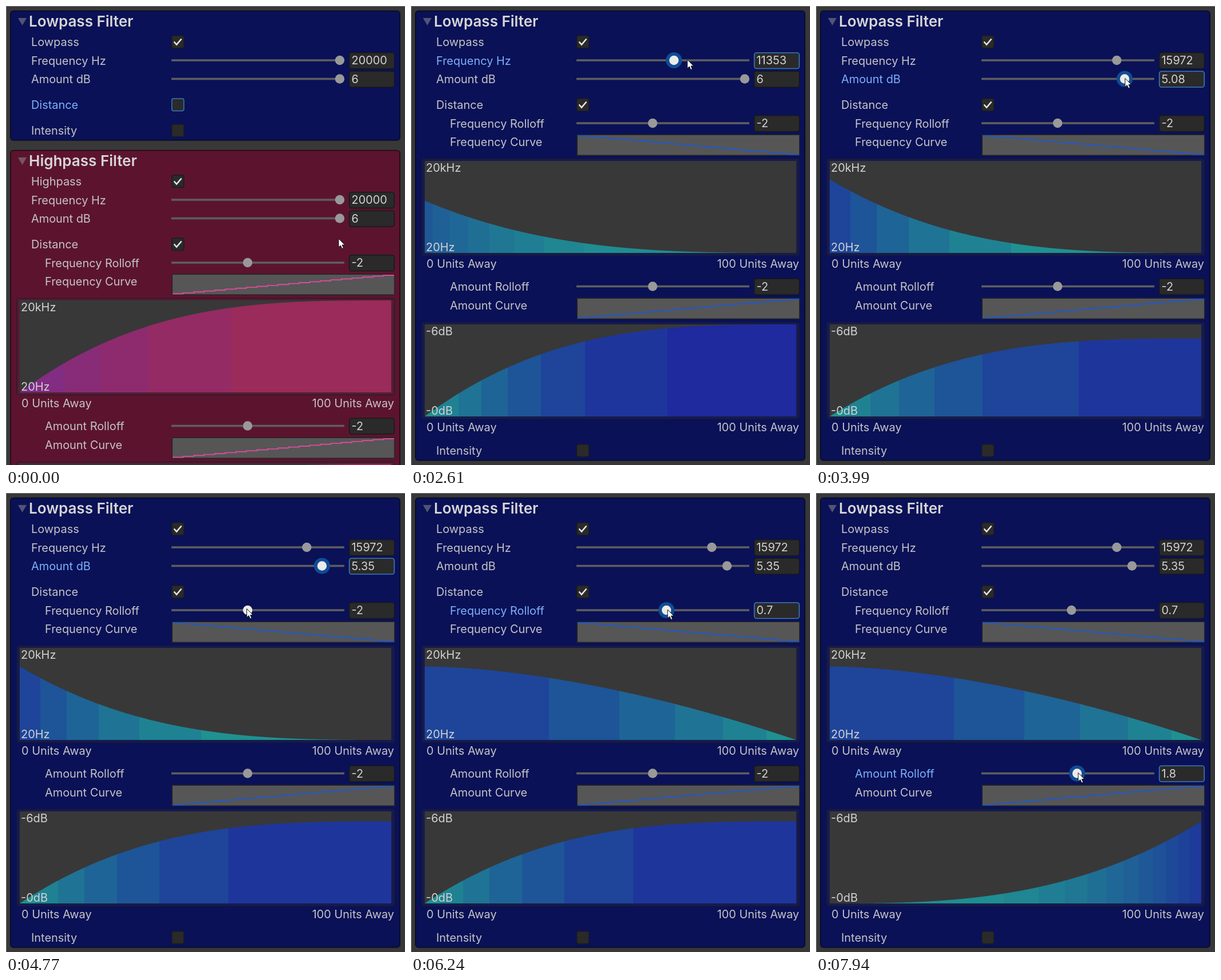
An HTML page with a canvas for the animation above (8 s loop, 697x803 px).

```html
<!DOCTYPE html>
<html lang="en">
<head>
<meta charset="utf-8">
<title>Filter inspector</title>
<style>
  html, body { margin: 0; width: 100%; height: 100%; overflow: hidden; background: #383838; }
  canvas { display: block; }
</style>
</head>
<body>
<canvas id="stage" width="697" height="803"></canvas>
<script>
const ctx = document.getElementById('stage').getContext('2d');
const LOOP = 8000;
const EXPAND_AT = 730;
const LAG = 60; // the knobs trail the pointer by this many ms

const controls = {
  frequency: { label: 'Frequency Hz', y: 95, min: 0, max: 20000, digits: 0 },
  amount: { label: 'Amount dB', y: 127.5, min: 0, max: 6, digits: 2 },
  freqRolloff: { label: 'Frequency Rolloff', y: 205, min: -16, max: 16, digits: 1, indent: true },
  amountRolloff: { label: 'Amount Rolloff', y: 490.5, min: -16, max: 16, digits: 1, indent: true }
};
const defaults = { distance: true, frequency: 20000, amount: 6, freqRolloff: -2, amountRolloff: -2 };

// A drag drifts to its final value while swinging on a sine; the pointer sets off at `reach`.
const drags = [
  { name: 'frequency', reach: 1830, start: 1930, end: 2780, to: 15972, swing: -9268, waves: 0.5 },
  { name: 'amount', reach: 3210, start: 3480, end: 4480, to: 5.35, swing: -0.589, waves: 0.5 },
  { name: 'freqRolloff', reach: 4590, start: 4800, end: 6100, to: 0.7, swing: -5.03, waves: 1 },
  { name: 'amountRolloff', reach: 6550, start: 7420, end: 7940, to: 1.8, swing: 0, waves: 0.5 }
];
const stops = [
  { reach: 60, start: 550, x: 303, y: 170 },
  { reach: 1390, start: 1600, x: 560, y: 90 },
  ...drags
];

const clamp = p => Math.min(1, Math.max(0, p));
const lerp = (a, b, p) => a + (b - a) * p;
const easeOut = p => 1 - (1 - p) ** 2;
const mix = (a, b, p) => `rgb(${a.map((v, i) => Math.round(lerp(v, b[i], p)))})`;
const knobX = (c, value) => 297 + 286 * (value - c.min) / (c.max - c.min);
const fall = (x, r) => r < 0 ? (1 - x) ** (1 - r) : 1 - x ** (1 + r);
const rise = (x, r) => r < 0 ? 1 - (1 - x) ** (1 - r) : x ** (1 + r);

function dragValue(drag, t) {
  const p = clamp((t - drag.start) / (drag.end - drag.start));
  return lerp(defaults[drag.name], drag.to, p) + drag.swing * Math.sin(2 * Math.PI * drag.waves * p);
}

function stopPoint(stop, t) {
  if (!stop.name) return stop;
  const control = controls[stop.name];
  return { x: knobX(control, dragValue(stop, t + LAG)) + 2, y: control.y - 1 };
}

function cursorAt(t) {
  let at = { x: 581, y: 407 };
  for (const stop of stops) {
    if (t < stop.reach) break;
    const goal = stopPoint(stop, t), p = easeOut(clamp((t - stop.reach) / (stop.start - stop.reach)));
    at = { x: lerp(at.x, goal.x, p), y: lerp(at.y, goal.y, p) };
  }
  return at;
}

function blueBand(v, fine) {
  const level = fine ? Math.max(1, Math.floor(v / 0.071 + 0.5)) * 0.071
                     : (Math.floor(v / 0.142 + 0.25) + 0.25) * 0.142;
  return mix([31, 149, 144], [30, 42, 157], clamp(level));
}
const pinkBand = v => mix([124, 44, 140], [154, 43, 90], Math.floor(v * 5 + 0.4) / 5);

function text(s, x, y, color = '#c4c4c4', font = '400 19.9px Inter, sans-serif', align = 'left') {
  ctx.font = font;
  ctx.textAlign = align;
  ctx.fillStyle = color;
  ctx.fillText(s, x, y);
}

function box(x, y, w, h, r, fill, stroke, line = 1.5) {
  ctx.beginPath();
  ctx.roundRect(x, y, w, h, r);
  ctx.fillStyle = fill;
  ctx.fill();
  ctx.strokeStyle = stroke;
  ctx.lineWidth = line;
  ctx.stroke();
}

function disc(x, y, r, color) {
  ctx.fillStyle = color;
  ctx.beginPath();
  ctx.arc(x, y, r, 0, Math.PI * 2);
  ctx.fill();
}

function label(name, y, indent, focused) {
  text(name, indent ? 68 : 44, y + 7, focused ? '#7db0fa' : '#c4c4c4');
}

function toggle(name, y, checked, focus) {
  const focused = name === focus;
  label(name, y, false, focused);
  box(289.7, y - 11, 21, 21.5, 3, '#2a2a2a', focused ? '#3a79bb' : '#1c1c1c');
  if (!checked) return;
  ctx.strokeStyle = '#e6e6e6';
  ctx.lineWidth = 2.6;
  ctx.stroke(new Path2D(`M293.5 ${y - 0.5}l4.5 5l8.5 -10`));
}

function slider(name, state) {
  const control = controls[name], y = control.y, value = state[name];
  const focused = control.label === state.focus;
  const x = knobX(control, value);
  label(control.label, y + 0.5, control.indent, focused);
  ctx.fillStyle = '#5e5e5e';
  ctx.fillRect(289, y - 1.8, 302, 3.6);
  if (focused) disc(x, y, 14, '#104c94');
  const hovered = state.cursor && Math.hypot(state.cursor.x - x, state.cursor.y - y) < 26;
  disc(x, y, 8.2, focused || hovered ? '#ebebeb' : '#999999');
  box(599.7, y - 13.3, 78.6, 27.8, 4, '#2a2a2a', focused ? '#3a79bb' : '#191919', 1.6);
  text(String(value), 603.5, y + 7, '#d2d2d2');
}

function curvePreview(name, y, rising, color) {
  label(name, y, true, false);
  ctx.fillStyle = '#242424';
  ctx.fillRect(289.5, y - 13.5, 390, 37.5);
  ctx.fillStyle = '#565656';
  ctx.fillRect(291, y - 12, 387, 34.5);
  const steps = 21, top = y - 11, height = 32.5;
  ctx.strokeStyle = color;
  ctx.lineWidth = 1.8;
  ctx.beginPath();
  for (let i = 0; i < steps; i++) {
    const p = i / (steps - 1), ly = top + height * (rising ? 1 - p : p);
    ctx.lineTo(291 + 387 * i / steps, ly);
    ctx.lineTo(291 + 387 * (i + 1) / steps, ly);
  }
  ctx.stroke();
}

function chart(top, curve, band, high, low) {
  const left = 24, width = 649, height = 161, bottom = top + height;
  box(19, top - 3.5, 659.5, 169, 4, 'rgba(56,56,56,.25)', 'rgba(28,28,40,.7)');
  ctx.fillStyle = '#383838';
  ctx.fillRect(left, top, width, height);
  ctx.save();
  ctx.beginPath();
  ctx.moveTo(left, bottom);
  for (let i = 0; i <= width; i++) ctx.lineTo(left + i, bottom - height * curve(i / width));
  ctx.lineTo(left + width, bottom);
  ctx.clip();
  for (let i = 0; i < width; i++) {
    ctx.fillStyle = band(curve((i + 0.5) / width));
    ctx.fillRect(left + i, top, 1, height);
  }
  ctx.restore();
  text(high, 26, top + 19, '#d2d2d2');
  text(low, 26, top + 158, '#d2d2d2');
  text('0 Units Away', 27, top + 186.5);
  text('100 Units Away', 678, top + 186.5, '#c4c4c4', undefined, 'right');
}

function filterPanel(title, name, theme, state) {
  box(8, 8.7, 680, state.distance ? 786 : 226, 5, theme.fill, theme.edge, 2);
  ctx.fillStyle = 'rgba(140,140,140,.55)';
  ctx.fill(new Path2D('M21 21h15l-7.5 13z'));
  text(title, 40, 36, '#d6d6d6', '600 26px Inter, sans-serif');
  toggle(name, 63, true, state.focus);
  slider('frequency', state);
  slider('amount', state);
  toggle('Distance', 173, state.distance, state.focus);
  if (state.distance) {
    const freqShape = theme.rising ? rise : fall;
    slider('freqRolloff', state);
    curvePreview('Frequency Curve', 238, theme.rising, theme.line);
    chart(271, x => state.frequency / 20000 * freqShape(x, state.freqRolloff),
      v => theme.band(v, ['frequency', 'freqRolloff'].includes(state.dragged)), '20kHz', '20Hz');
    slider('amountRolloff', state);
    curvePreview('Amount Curve', 524, true, theme.line);
    chart(557, x => state.amount / 6 * rise(x, state.amountRolloff),
      v => theme.band(v, state.dragged === 'amountRolloff'), '-6dB', '-0dB');
  }
  toggle('Intensity', state.distance ? 778 : 218, false, state.focus);
}

function pointer({ x, y }) {
  const arrow = new Path2D('M0 0v15l3.5 -3l2.5 5.5l2.5 -1.1l-2.3 -5.4h4.6z');
  ctx.save();
  ctx.translate(x, y);
  ctx.fillStyle = '#fff';
  ctx.strokeStyle = '#111';
  ctx.lineWidth = 1;
  ctx.fill(arrow);
  ctx.stroke(arrow);
  ctx.restore();
}

const blue = { fill: '#0a1157', edge: '#090c2c', line: '#1f58cc', rising: false, band: blueBand };
const red = { fill: '#5c142e', edge: '#2c0c18', line: '#dc4a9c', rising: true, band: pinkBand };

function draw(t) {
  const latest = drags.filter(d => d.start <= t).pop();
  const state = {
    cursor: cursorAt(t),
    distance: t >= EXPAND_AT,
    focus: latest ? controls[latest.name].label : 'Distance',
    dragged: latest && t < latest.end + LAG ? latest.name : null
  };
  for (const drag of drags) state[drag.name] = +dragValue(drag, t).toFixed(controls[drag.name].digits);

  ctx.fillStyle = '#7a7a7a';
  ctx.fillRect(0, 0, 697, 803);
  ctx.fillStyle = '#383838';
  ctx.fillRect(1, 1, 696, 802);
  filterPanel('Lowpass Filter', 'Lowpass', blue, state);
  if (!state.distance) {
    ctx.save();
    ctx.translate(0, 244);
    filterPanel('Highpass Filter', 'Highpass', red, defaults);
    ctx.restore();
  }
  pointer(state.cursor);
}

const start = performance.now();
function tick() {
  draw((performance.now() - start) % LOOP);
  requestAnimationFrame(tick);
}
tick();
</script>
</body>
</html>
```
